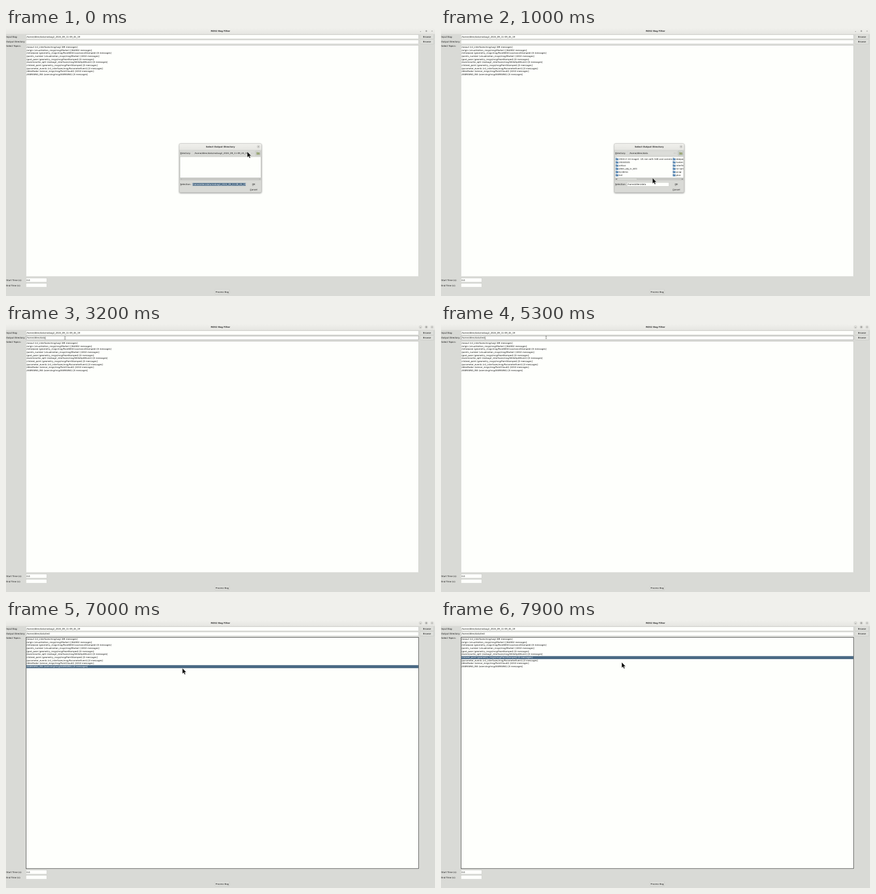
Animation of 800 by 500 pixels, one loop 8000 ms. Source, as an HTML page:

```html
<!DOCTYPE html>
<html lang="en">
<head>
<meta charset="utf-8">
<title>ROS2 Bag Filter</title>
<style>
  html, body { margin: 0; width: 100%; height: 100%; overflow: hidden; background: #d9dad6; }
  svg { display: block; width: 800px; height: 500px; }
  text { font: 4.0625px "DejaVu Sans", sans-serif; fill: #111; white-space: pre; text-rendering: geometricPrecision; }
  .bold { font-weight: bold; fill: #333; }
  .mid { text-anchor: middle; }
  .picked { fill: #fff; }
</style>
</head>
<body>
<svg id="stage" viewBox="0 0 800 500">
  <defs>
    <linearGradient id="bar" x2="0" y2="1">
      <stop offset="0" stop-color="#f0f0ec"/>
      <stop offset="1" stop-color="#e6e6e2"/>
    </linearGradient>
    <filter id="shadow" x="-10%" y="-10%" width="120%" height="125%">
      <feDropShadow dx="0" dy="1" stdDeviation="1.5" flood-opacity=".45"/>
    </filter>
    <clipPath id="files"><rect x="325" y="240" width="127" height="39"/></clipPath>
  </defs>
</svg>
<script>
const NS = 'http://www.w3.org/2000/svg';
const LOOP = 8000, STEP = 100;
const FACE = '#d9dad6', PAPER = '#fefffc', EDGE = '#b4b5b1', SELECT = '#4a6984';
const HOME = '/home/dilen/data', BAG = HOME + '/rosbag2_2024_09_11-09_45_19';
const ROW_TOP = 33.2, ROW_H = 5.625;

const topics = [
  '/rosout (rcl_interfaces/msg/Log) [89 messages]',
  '/origin (visualization_msgs/msg/Marker) [364002 messages]',
  '/initialpose (geometry_msgs/msg/PoseWithCovarianceStamped) [0 messages]',
  '/points_number (visualization_msgs/msg/Marker) [4310 messages]',
  '/goal_pose (geometry_msgs/msg/PoseStamped) [0 messages]',
  '/events/write_split (rosbag2_interfaces/msg/WriteSplitEvent) [0 messages]',
  '/clicked_point (geometry_msgs/msg/PointStamped) [0 messages]',
  '/parameter_events (rcl_interfaces/msg/ParameterEvent) [0 messages]',
  '/dilenRadar (sensor_msgs/msg/PointCloud2) [4310 messages]',
  '/ASENSING_INS (asensing/msg/ASENSING) [0 messages]'
];
const folders = [
  ['2024-2-14 image1  US rain with 548 and camera', 'deepway'],
  ['20240101', 'harbin'],
  ['airbus', 'interfere'],
  ['dilen_obj_in_kitti', 'lvi-sam'],
  ['bj-demo', 'pcap'],
  ['bst', 'plus']
];

// Pointer track: time, x, y
const track = [
  [0, 450, 231], [300, 466, 232], [600, 469, 233], [700, 446, 252], [900, 398, 284.5],
  [1000, 394.5, 280], [1200, 392.5, 276], [1300, 392.5, 276], [1700, 406, 281],
  [2200, 437, 291], [2500, 437, 291], [2600, 430, 282], [2700, 380, 215],
  [2800, 270, 110], [2900, 160, 45], [3000, 110, 26], [5200, 110, 26],
  [5300, 196, 25], [5400, 270, 28], [5500, 380, 38], [5600, 454, 52], [5700, 440, 67],
  [5800, 390, 77], [6000, 305, 84], [6400, 305, 84], [6700, 296, 80], [6800, 296, 80],
  [7000, 329, 90], [7400, 336, 65], [7500, 336, 68], [7700, 337, 71], [7900, 337, 79]
];
// Output entry: time, text
const typing = [
  [0, ''], [2600, HOME], [4100, HOME + '/'], [4400, HOME + '/t'],
  [4500, HOME + '/te'], [4700, HOME + '/tes'], [5000, HOME + '/test']
];
// Caret: time, shown
const blink = [[0, 0], [3200, 1], [3800, 0], [4000, 1], [5600, 0], [5900, 1], [6200, 0]];
// Selected topic: time, row
const picks = [[0, -1], [6200, 9], [7500, 6]];

function el(parent, tag, attrs = {}) {
  const node = parent.appendChild(document.createElementNS(NS, tag));
  for (const key in attrs) node.setAttribute(key, attrs[key]);
  return node;
}
const group = parent => el(parent, 'g');
const path = (parent, d, attrs) => el(parent, 'path', { d, fill: 'none', ...attrs });
function box(parent, x, y, width, height, fill, stroke = 'none', rx = 0) {
  return el(parent, 'rect', { x, y, width, height, fill, stroke, rx, 'stroke-width': .35 });
}
function label(parent, x, y, string, cls = '') {
  const node = el(parent, 'text', { x, y, class: cls });
  node.textContent = string;
  return node;
}
function button(parent, x, y, w, h, string) {
  const r = box(parent, x, y, w, h, '#dedfdb', '#b0b1ad', .5);
  path(parent, `M${x + .4} ${y + h - .4}V${y + .4}H${x + w - .4}`, { stroke: '#f4f4f0', 'stroke-width': .3 });
  label(parent, x + w / 2, y + h / 2 + 1.5, string, 'mid');
  return r;
}
const show = (node, on) => node.setAttribute('visibility', on ? 'visible' : 'hidden');
const held = (table, t) => table.filter(row => row[0] <= t).pop()[1];

function pointerAt(t) {
  const i = track.findIndex(p => p[0] > t);
  if (i < 0) return track[track.length - 1].slice(1);
  const [a, b] = [track[i - 1], track[i]];
  const k = (t - a[0]) / (b[0] - a[0]);
  return [a[1] + (b[1] - a[1]) * k, a[2] + (b[2] - a[2]) * k];
}

const stage = document.getElementById('stage');
box(stage, 0, 0, 800, 500, FACE);

// Window title bar
box(stage, 0, 0, 800, 11.5, 'url(#bar)');
path(stage, 'M0 11.6H800', { stroke: '#cfcfcb', 'stroke-width': .3 });
label(stage, 400, 7.3, 'ROS2 Bag Filter', 'bold mid');
const rings = group(stage);
for (const cx of [773, 783.8, 794.5])
  el(rings, 'circle', { cx, cy: 5.7, r: 2.7, fill: '#dededa', stroke: '#bcbcb8', 'stroke-width': .35 });
path(stage, 'M772 6.6H774M782.9 4.8H784.7V6.6H782.9ZM793.7 4.9L795.3 6.5M795.3 4.9L793.7 6.5',
  { stroke: '#444', 'stroke-width': .45 });

// Form
label(stage, .6, 17.8, 'Input Bag:');
label(stage, .6, 27.3, 'Output Directory:');
label(stage, .6, 35.3, 'Select Topics:');
label(stage, .6, 471.9, 'Start Time (s):');
label(stage, .6, 481.6, 'End Time (s):');
box(stage, 37.2, 12.7, 732, 7.4, PAPER, EDGE);
const outBox = box(stage, 37.2, 22.3, 732, 7.4, PAPER, EDGE);
box(stage, 37.2, 466.7, 38.8, 7.3, PAPER, EDGE);
box(stage, 37.2, 476.4, 38.8, 7.3, PAPER, EDGE);
label(stage, 38.2, 17.8, BAG);
label(stage, 38.2, 471.9, '0.0');
const outText = label(stage, 38.2, 27.3, '');
const caret = box(stage, 0, 23.6, .5, 5, '#000');
button(stage, 772.6, 12.1, 25.2, 8.4, 'Browse');
button(stage, 772.6, 21.6, 25.2, 8.4, 'Browse');
button(stage, 389.8, 488, 26.8, 8.5, 'Process Bag');

// Topic list
const listBox = box(stage, 37.3, 32.6, 732, 431.2, PAPER, EDGE);
const bar = box(stage, 37.7, 0, 731.2, ROW_H, SELECT);
const rows = topics.map((name, i) => label(stage, 38.1, ROW_TOP + 3.95 + i * ROW_H, name));

function folder(parent, x, y) {
  path(parent, `M${x} ${y - 1.8}h1.8l.6 .6h2.4v3.4h-4.8z`, { fill: '#4f7fac', stroke: '#315d88', 'stroke-width': .25 });
  path(parent, `M${x + .3} ${y - .3}h4.2`, { stroke: '#a5c5e2', 'stroke-width': .7 });
}

// Directory chooser whose right edge is at the given x
function chooser(right, dir, filled) {
  const g = group(stage), w = right - 323.2;
  const frame = box(g, 323.2, 215.7, w, 91.2, FACE, '#8d8e8a', 2);
  frame.setAttribute('filter', 'url(#shadow)');
  path(g, `M323.4 227.3V217.7q0 -1.8 1.8 -1.8H${right - 2}q1.8 0 1.8 1.8V227.3Z`, { fill: 'url(#bar)' });
  label(g, 323.2 + w / 2, 223, 'Select Output Directory', 'bold mid');
  const cx = right - 5.7;
  el(g, 'circle', { cx, cy: 221.4, r: 2.6, fill: '#dededa', stroke: '#b8b8b4', 'stroke-width': .35 });
  path(g, `M${cx - .8} 220.6l1.6 1.6m0 -1.6l-1.6 1.6`, { stroke: '#333', 'stroke-width': .45 });

  label(g, 324.8, 234.9, 'Directory:');
  path(g, 'M324.9 235.7h3', { stroke: '#111', 'stroke-width': .3 });
  box(g, 348.3, 229.2, right - 13.4 - 348.3, 8.5, '#dcddd9', '#c9cac6');
  label(g, 351.3, 234.9, dir);
  box(g, right - 18.8, 233, 3.6, 1, '#e8e9e5', '#adaeaa');
  box(g, right - 11, 229.2, 9, 8.7, '#d5d8d1', filled ? '#7f9b9b' : '#aaaba7', .5);
  path(g, `M${right - 9} 231.9h2l.7 .7h2.9v3.4h-5.6z`, { fill: '#b3bc8b', stroke: '#65704a', 'stroke-width': .4 });
  path(g, `M${right - 6.3} 235.3v-2m-.9 .9l.9 -.9l.9 .9`, { stroke: '#426534', 'stroke-width': .45 });

  box(g, 324.7, 240.1, w - 2.6, 39.3, PAPER, '#a5a6a2');
  box(g, 324.7, 280, w - 2.6, 3.9, '#c9cac6', '#b6b7b3');
  if (filled) {
    box(g, 328.6, 280.2, 37, 3.5, '#e0e1dd', '#a0a19d');
    const inner = el(g, 'g', { 'clip-path': 'url(#files)' });
    folders.forEach((pair, i) => pair.forEach((name, col) => {
      const x = 325.9 + col * 106.5, y = 244.4 + i * 5.97;
      folder(inner, x, y);
      label(inner, x + 6.2, y + 1.4, name);
    }));
  }
  const arrow = { fill: filled ? '#222' : '#a0a19d' };
  path(g, `M327.6 281v2l-1.3 -1zM${right - 3.9} 281v2l1.3 -1z`, arrow);

  label(g, 324.8, 293.1, 'Selection:');
  path(g, 'M324.9 293.9h2.4', { stroke: '#111', 'stroke-width': .3 });
  box(g, 346.9, 288.2, right - 28.4 - 346.9, 7, PAPER, EDGE);
  if (!filled) box(g, 347.7, 289.1, right - 29.2 - 347.7, 5.3, SELECT);
  label(g, 347.8, 293.1, dir, filled ? '' : 'picked');
  const bx = right - 14.6;
  const ok = box(g, bx - 12.4, 288, 25, 7.7, '#e2e3df', '#62635f', .5);
  label(g, bx, 293.2, 'OK', 'mid');
  label(g, bx, 302.7, 'Cancel', 'mid');
  path(g, `M${bx - 2.9} 294h3M${bx - 6.9} 303.5h2.7`, { stroke: '#111', 'stroke-width': .3 });
  return { g, ok };
}
const wide = chooser(476.4, BAG, false);
const narrow = chooser(453.4, HOME, true);
show(wide.ok, false);

// Pointers
const arrow = path(stage, 'M0 0V10.2L2.4 8L4.1 11.8L5.7 11.1L4.1 7.4H7.2Z',
  { fill: '#080808', stroke: '#f4f4f0', 'stroke-width': .35 });
const beam = path(stage, 'M-1 -2.4Q0 -2.4 0 -1.8Q0 -2.4 1 -2.4M0 -1.8V1.8M-1 2.4Q0 2.4 0 1.8Q0 2.4 1 2.4',
  { stroke: '#111', 'stroke-width': .5 });

function draw(now) {
  const t = Math.floor(now % LOOP / STEP) * STEP;
  const open = t < 2600;
  wide.g.style.display = t < 600 ? '' : 'none';
  narrow.g.style.display = open && t >= 600 ? '' : 'none';
  narrow.ok.style.visibility = open && t >= 2100 ? 'visible' : 'hidden';
  show(rings, !open);

  outText.textContent = held(typing, t);
  const caretOn = held(blink, t);
  show(caret, caretOn);
  if (caretOn) caret.setAttribute('x', 38.2 + outText.getComputedTextLength());
  outBox.setAttribute('stroke', t >= 3200 && t < 6200 ? '#555' : EDGE);
  listBox.setAttribute('stroke', t >= 6200 ? '#000' : EDGE);
  listBox.setAttribute('stroke-width', t >= 6200 ? .6 : .35);

  const pick = held(picks, t);
  show(bar, pick >= 0);
  bar.setAttribute('y', ROW_TOP + .4 + Math.max(pick, 0) * ROW_H);
  rows.forEach((row, i) => row.setAttribute('class', i === pick ? 'picked' : ''));

  const [x, y] = pointerAt(t);
  const typingArea = y > 22 && y < 30 && x > 37 && x < 769;
  const at = `translate(${x} ${y})`;
  arrow.setAttribute('transform', at);
  beam.setAttribute('transform', at);
  show(arrow, !typingArea);
  show(beam, typingArea);
}

function tick() {
  draw(performance.now());
  requestAnimationFrame(tick);
}
tick();
</script>
</body>
</html>
```
